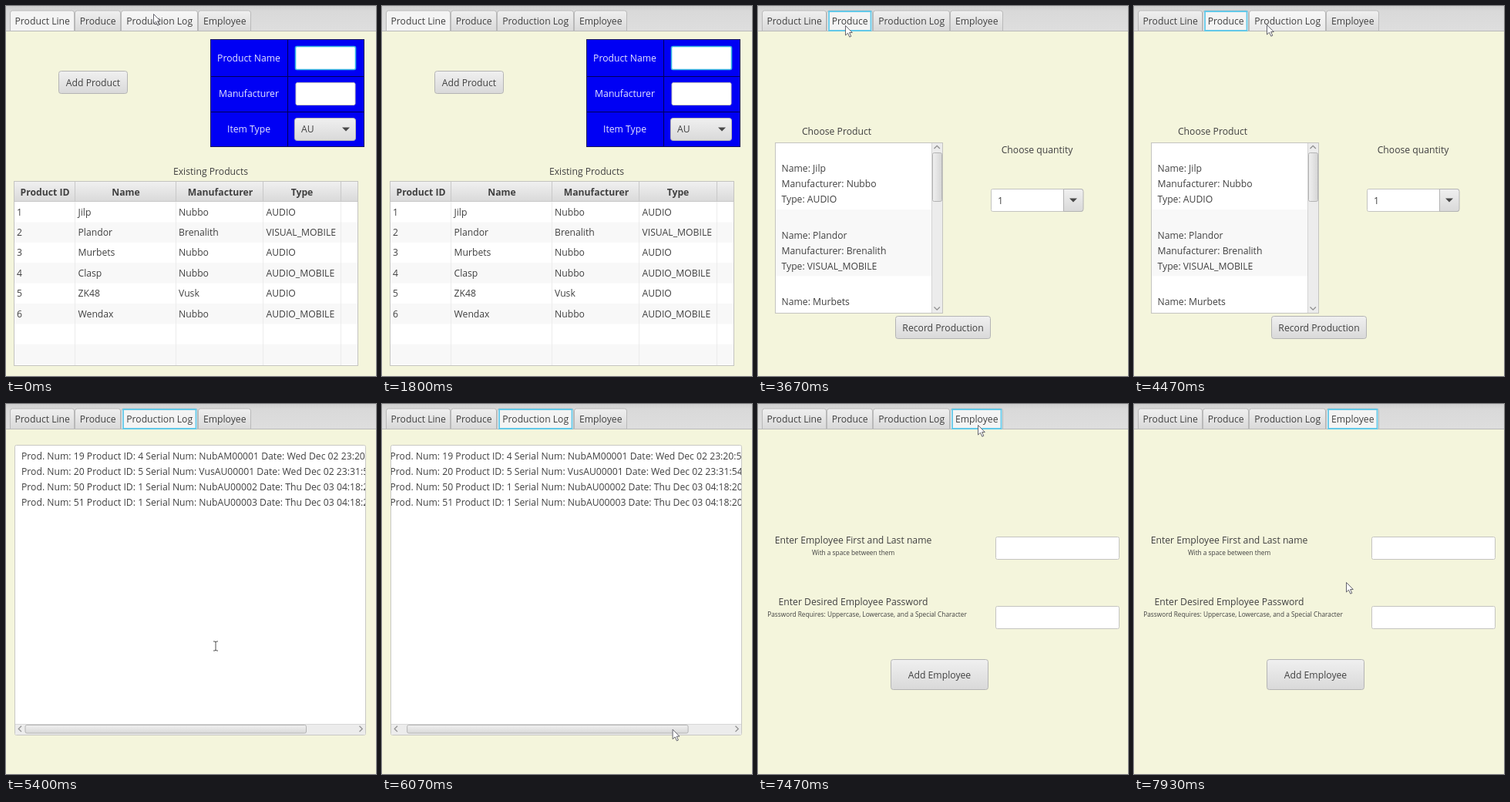
These frames come from a looping animation (480 px wide and 480 px high, 8000 ms). An HTML page:

```html
<!DOCTYPE html>
<html lang="en">
<head>
<meta charset="utf-8">
<title>Production tracker</title>
<style>
  html, body { margin: 0; width: 100%; height: 100%; overflow: hidden; background: #f4f5dc; }
  svg { display: block; width: 480px; height: 480px; }
  text { font: 12.2px "Open Sans", "Noto Sans", sans-serif; fill: #404040; white-space: pre; }
  .bold { font-weight: 700; }
  .small { font-size: 8.3px; }
  .light { fill: #e6e6ff; }
  .chevron { fill: none; stroke: #8f8f8f; stroke-width: 1.3; }
</style>
</head>
<body>
<svg id="stage" viewBox="0 0 480 480">
  <defs>
    <linearGradient id="bar" x2="0" y2="1"><stop stop-color="#cfcfcf"/><stop offset=".2" stop-color="#d9d9d9"/><stop offset="1" stop-color="#dedede"/></linearGradient>
    <linearGradient id="btn" x2="0" y2="1"><stop stop-color="#f0f0f0"/><stop offset="1" stop-color="#d9d9d9"/></linearGradient>
    <linearGradient id="hot" x2="0" y2="1"><stop stop-color="#f8f8f8"/><stop offset="1" stop-color="#e9e9e9"/></linearGradient>
    <linearGradient id="thumbV"><stop stop-color="#f0f0f0"/><stop offset="1" stop-color="#d6d6d6"/></linearGradient>
    <clipPath id="logClip"><rect x="12" y="54" width="454" height="361"/></clipPath>
  </defs>
</svg>
<script>
const GRAY = '#b9b9b9', LOOP = 8000;

const rect = (x, y, w, h, fill, stroke = 'none', r = 0, more = '') =>
  `<rect x="${x}" y="${y}" width="${w}" height="${h}" rx="${r}" fill="${fill}" stroke="${stroke}" ${more}/>`;
const text = (x, y, s, cls = '') => `<text x="${x}" y="${y}" class="${cls}">${s}</text>`;
const mid = (x, y, s, cls = '') => `<text x="${x}" y="${y}" class="${cls}" text-anchor="middle">${s}</text>`;
const path = (d, more) => `<path d="${d}" ${more}/>`;
const line = (d, color) => path(d, `fill="none" stroke="${color}"`);
const chevron = d => path(d, 'class="chevron"');
const drop = (x, y) => path(`M${x - 5} ${y}h10l-5 5z`, 'fill="#484848"');
const field = (x, y, w, h) => rect(x, y, w, h, '#fff', '#c4c4c0', 2);
const button = (x, y, w, h, label) =>
  rect(x, y, w, h, 'url(#btn)', '#b4b4b4', 3) + mid(x + w / 2, y + h / 2 + 4.5, label);

const products = [
  ['Jilp', 'Nubbo', 'AUDIO'],
  ['Plandor', 'Brenalith', 'VISUAL_MOBILE'],
  ['Murbets', 'Nubbo', 'AUDIO'],
  ['Clasp', 'Nubbo', 'AUDIO_MOBILE'],
  ['ZK48', 'Vusk', 'AUDIO'],
  ['Wendax', 'Nubbo', 'AUDIO_MOBILE']
];

function productLine() {
  const rowH = 26.4, top = 254;
  let s = button(68.5, 84.5, 89, 29, 'Add Product');
  s += rect(265.5, 43.5, 199, 139, '#0000f4', '#15155a');
  s += line('M365.5 44V182M266 91.5H464M266 137.5H464', '#000058');
  ['Product Name', 'Manufacturer', 'Item Type'].forEach((label, i) =>
    s += mid(315, 72 + i * 46.2, label, 'light'));
  s += rect(375.5, 52.5, 78, 30, '#fff', '#35b5e0', 2, 'stroke-width="1.6"') + field(376, 99.5, 77, 29);
  s += rect(374.5, 145.5, 79, 29, 'url(#btn)', '#b4b4b4', 3) + text(383, 164, 'AU') + drop(441, 157.5);
  s += mid(265.5, 218.5, 'Existing Products');

  s += rect(10.5, 227.5, 446, 239, '#fff', '#c4c4c0');
  for (let i = 1; i < 8; i += 2) s += rect(11, top + i * rowH, 445, rowH, '#f8f8f8');
  s += line('M89.5 254V466M220.5 254V466M333.5 254V466M434.5 254V466', '#ececec');
  s += rect(11, 228, 445, 26, 'url(#btn)');
  s += line('M11 253.5H456M89.5 228V254M220.5 228V254M333.5 228V254M434.5 228V254', '#c8c8c8');
  [[50.5, 'Product ID'], [155.5, 'Name'], [278, 'Manufacturer'], [384, 'Type']].forEach(
    ([x, label]) => s += mid(x, 245.5, label, 'bold'));
  products.forEach((p, i) => [i + 1, ...p].forEach((cell, c) =>
    s += text([14, 93.5, 224, 337.5][c], 271.5 + i * rowH, cell)));
  return s;
}

function produce() {
  let s = mid(102, 166.5, 'Choose Product') + rect(22.5, 177.5, 217, 221, '#fff', '#c4c4c0');
  s += rect(23, 264, 202, 86.4, '#f8f8f8');
  products.slice(0, 3).forEach(([name, maker, type], i) => {
    const y = 215.3 + i * 86.4;
    s += text(30.5, y, 'Name: ' + name);
    if (i < 2) s += text(30.5, y + 20, 'Manufacturer: ' + maker) + text(30.5, y + 40, 'Type: ' + type);
  });
  s += rect(225, 178, 14, 220, '#ececec') + line('M225.5 178V398', '#d4d4d4');
  s += rect(226.5, 190.5, 12, 63, 'url(#thumbV)', '#b4b4b4', 2);
  s += chevron('M228.5 185l3.7-3.7 3.7 3.7') + chevron('M228.5 390.5l3.7 3.7 3.7-3.7');
  s += mid(362, 191, 'Choose quantity') + field(302.5, 237.5, 119, 29) + text(311, 256.5, '1');
  s += path('M396.5 237.5h22.5q3 0 3 3v23q0 3-3 3h-22.5z', 'fill="url(#btn)" stroke="#b4b4b4"') + drop(409, 249.5);
  return s + button(178.5, 402.5, 123, 29, 'Record Production');
}

function productionLog() {
  const entries = [
    [19, 4, 'NubAM00001', 'Wed Dec 02 23:20:55'],
    [20, 5, 'VusAU00001', 'Wed Dec 02 23:31:54'],
    [50, 1, 'NubAU00002', 'Thu Dec 03 04:18:20'],
    [51, 1, 'NubAU00003', 'Thu Dec 03 04:18:20']
  ];
  let s = rect(11.5, 53.5, 455, 376, '#fff', '#c8c8c4', 2) + '<g clip-path="url(#logClip)"><g id="logText">';
  entries.forEach(([num, id, serial, date], i) => s += text(20, 71.5 + i * 20,
    `Prod. Num: ${num} Product ID: ${id} Serial Num: ${serial} Date: ${date} EST 2020`));
  s += '</g></g>' + rect(12, 415, 454, 14, '#ececec') + line('M12 415.5H466', '#d8d8d8');
  s += `<g id="thumb">${rect(25, 416.5, 364.5, 10.5, 'url(#btn)', '#b4b4b4', 2)}</g>`;
  return s + chevron('M20 417.7l-3.7 3.7 3.7 3.7') + chevron('M458.5 417.7l3.7 3.7-3.7 3.7');
}

function employee() {
  return mid(123.5, 180.5, 'Enter Employee First and Last name') +
    mid(123.5, 195.7, 'With a space between them', 'small') +
    mid(123.5, 260.5, 'Enter Desired Employee Password') +
    mid(141.5, 275.7, 'Password Requires: Uppercase, Lowercase, and a Special Character', 'small') +
    field(308.5, 172.5, 160, 29) + field(308.5, 262.5, 160, 29) +
    button(172.5, 331.5, 126, 39, 'Add Employee');
}

// Label, left edge, right edge, time the tab opens, areas with a text pointer
const tabs = [
  ['Product Line', 5.5, 88.5, 0, [[376, 52, 454, 129]]],
  ['Produce', 89.5, 148.5, 3070, []],
  ['Production Log', 149.5, 248.5, 4730, [[12, 54, 466, 415]]],
  ['Employee', 249.5, 317.5, 7470, [[309, 172, 468, 201], [309, 262, 468, 291]]]
];

let markup = rect(0, 0, 480, 480, '#f4f5dc') + rect(0, 0, 480, 33, 'url(#bar)') + line('M0 32.5H480', GRAY);
tabs.forEach(([label, x0, x1], i) => {
  markup += path(`M${x0} 32.5V9q0-3 3-3H${x1 - 3}q3 0 3 3V32.5z`, `class="tab" stroke="${GRAY}"`);
  markup += path(`M${x0 + 2.5} 32V7H${x1 - 2}V32z`, 'class="ring" fill="none" stroke="#62c8e8" stroke-width="1.8"');
  markup += mid((x0 + x1) / 2 + .2, 24.3, label);
});
[productLine, produce, productionLog, employee].forEach(draw => markup += `<g class="page">${draw()}</g>`);
markup += path('M.5 .5V13l3-2.8 2.3 5 2-.9-2.2-4.8h3.7z', 'id="arrow" fill="#fff" stroke="#55555f" stroke-width=".9"');
markup += path('M-3-6h2l1 1 1-1h2M0-5V5M-3 6h2l1-1 1 1h2', 'id="beam" fill="none" stroke="#505050"');

const stage = document.getElementById('stage');
stage.insertAdjacentHTML('beforeend', markup);
const all = q => [...stage.querySelectorAll(q)];
const tabEls = all('.tab'), rings = all('.ring'), pages = all('.page');
const [arrow, beam, thumb, logText] = ['#arrow', '#beam', '#thumb', '#logText'].map(q => stage.querySelector(q));

// Pointer stops: time, x, y
const stops = [
  [70, 191, 10], [450, 130, 105], [900, 330, 160], [1350, 280, 330], [1750, 410, 115],
  [1880, 400, 112], [2600, 114, 24], [2870, 113, 25], [3670, 113, 25], [4050, 165, 200],
  [4470, 172, 24], [5130, 172, 24], [5400, 272, 314], [5870, 369, 419], [6000, 369, 421],
  [6330, 433, 427], [6400, 433, 433], [6800, 400, 300], [7330, 285, 27], [7530, 285, 27],
  [7930, 275, 231]
];

const ease = (t, a, b) => {
  const k = Math.min(1, Math.max(0, (t - a) / (b - a)));
  return k * k * (3 - 2 * k);
};

function pointer(t) {
  let [, x, y] = stops[0];
  for (let i = 1; i < stops.length; i++) {
    const [t0, x0, y0] = stops[i - 1], [t1, x1, y1] = stops[i];
    const k = ease(t, t0, t1);
    x += (x1 - x0) * k;
    y += (y1 - y0) * k;
  }
  return [x, y];
}

const show = (el, on) => el.style.display = on ? '' : 'none';
const move = (el, x, y) => el.setAttribute('transform', `translate(${x} ${y})`);

function render(t) {
  const [x, y] = pointer(t);
  const open = tabs.filter(tab => t >= tab[3]).length - 1;
  const visible = t < 1750 || t > 1880;

  tabs.forEach(([, x0, x1], i) => {
    const hover = visible && x >= x0 && x < x1 && y > 6 && y < 33;
    tabEls[i].setAttribute('fill', i === open ? '#f4f4f4' : hover ? 'url(#hot)' : 'url(#btn)');
    show(rings[i], i && i === open);
    show(pages[i], i === open);
  });

  const scroll = ease(t, 6000, 6330);
  move(thumb, 64 * scroll, 0);
  move(logText, -80 * scroll, 0);

  const typing = tabs[open][4].some(([l, top, r, b]) => x > l && x < r && y > top && y < b);
  show(arrow, visible && !typing);
  show(beam, visible && typing);
  move(arrow, x, y);
  move(beam, x, y);
}

const start = performance.now();
function tick() {
  render((performance.now() - start) % LOOP);
  requestAnimationFrame(tick);
}
tick();
</script>
</body>
</html>
```
